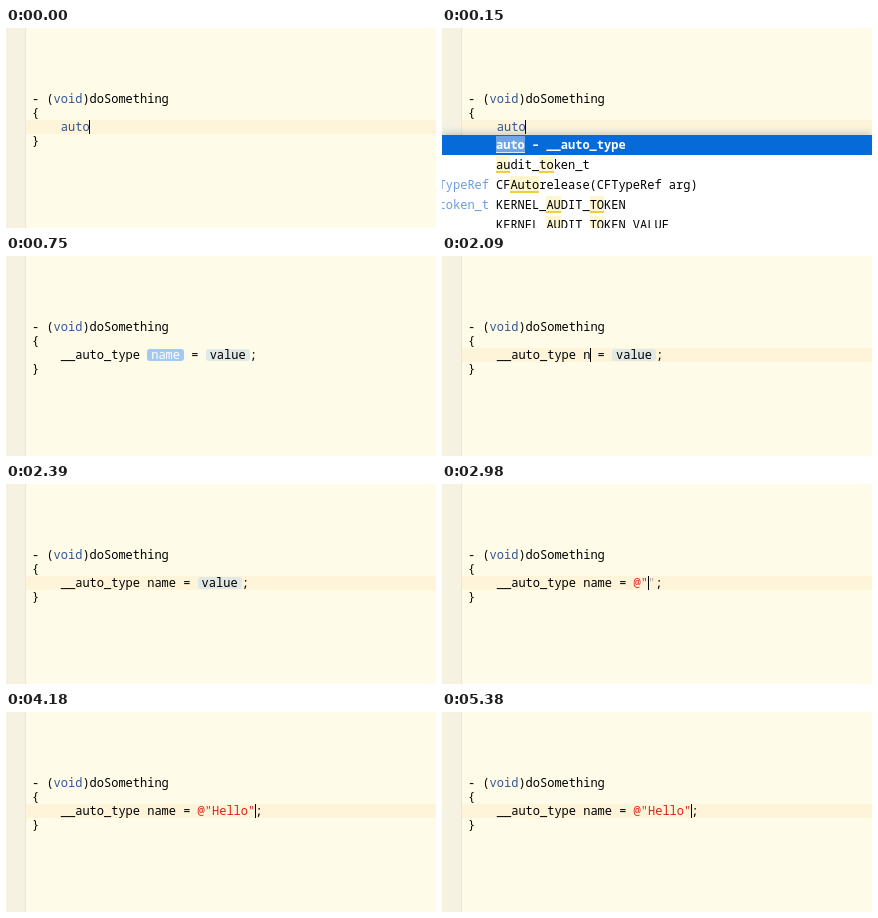
An HTML page for the animation above (5.77 s loop, 430 by 200 pixels).

```html
<!DOCTYPE html>
<html lang="en">
<head>
<meta charset="utf-8">
<title>Code completion</title>
<style>
  html, body { margin: 0; width: 100%; height: 100%; overflow: hidden; }
  body {
    position: relative;
    background: #fefbe8;
    color: #000;
    font: 500 12px/14px "Noto Sans Mono", "DejaVu Sans Mono", monospace;
    font-variant-ligatures: none;
    white-space: pre;
  }
  #gutter {
    position: absolute; left: 0; top: 0; width: 19px; height: 200px;
    background: #f5f2e2; border-right: 1px solid #e9e6d8;
  }
  .line { position: absolute; left: 26px; height: 14px; }
  #active { position: absolute; left: 20px; right: 0; top: 92px; height: 14px; background: #fdf4da; }
  #caret { position: absolute; top: 92px; width: 1px; height: 14px; background: #000; }
  .kw { color: #34568f; }
  .str { color: #dc2416; }
  .dim { color: #b3aaa4; }
  .slot {
    display: inline-block; height: 12px; line-height: 12px; padding: 0 4px;
    border-radius: 3px; background: #e0e9e6; vertical-align: top; margin-top: 1px;
  }
  .slot.on { background: #a3c8f2; color: #fff; }
  .popup {
    position: absolute; top: 107px; right: 0; overflow: hidden;
    background: #fff; line-height: 20px; box-shadow: 0 0 9px rgba(0, 0, 0, .28);
  }
  #list { left: 0; height: 93px; }
  #hint { left: 103px; height: 20px; }
  .row { position: relative; height: 20px; }
  .row > * { position: absolute; top: 0; }
  .row > i { right: calc(100% - 47px); font-style: normal; color: #6b9be0; }
  .row > span { left: 54px; }
  #hint .row > span { left: 38px; }
  .row b { font-weight: inherit; background: #fdf6d0; box-shadow: inset 0 -2px #f0cf3c; }
  .row.sel { background: #076ad9; color: #fff; font-weight: 700; }
  .row.sel b { background: #6fa5e6; box-shadow: inset 0 -1px #dce9fa; }
  [hidden] { display: none !important; }
</style>
</head>
<body>
<div id="gutter"></div>
<div id="active"></div>
<div class="line" style="top:64px">- (<span class="kw">void</span>)doSomething</div>
<div class="line" style="top:78px">{</div>
<div class="line" style="top:92px" id="code"></div>
<div class="line" style="top:106px">}</div>
<div id="caret"></div>
<div class="popup" id="list"><div class="row sel"><span><b>auto</b> – __auto_type</span></div><div class="row"><span><b>au</b>dit_<b>to</b>ken_t</span></div><div class="row"><i>CFTypeRef</i><span>CF<b>Auto</b>release(CFTypeRef arg)</span></div><div class="row"><i>audit_token_t</i><span>KERNEL_<b>AU</b>DIT_<b>TO</b>KEN</span></div><div class="row"><span>KERNEL_<b>AU</b>DIT_<b>TO</b>KEN_VALUE</span></div></div>
<div class="popup" id="hint"><div class="row sel"><span><b>nam</b>e</span></div></div>
<script>
  const LOOP = 5770, LEFT = 26, CHAR = 7.2;
  const el = id => document.getElementById(id);
  const [code, active, caret, list, hint] = ["code", "active", "caret", "list", "hint"].map(el);

  const span = (cls, text) => `<span class="${cls}">${text}</span>`;
  const slot = (text, on) => span(on ? "slot on" : "slot", text);
  const assign = (name, value) => `    __auto_type ${name} = ${value};`;
  const auto = "    " + span("kw", "auto");
  const open = text => assign("name", span("str", '@"' + text) + span("dim", '"'));
  const done = assign("name", span("str", '@"Hello"'));

  // at: start in ms, col: caret column, plain: no line highlight
  const steps = [
    { at: 0, html: auto, col: 8 },
    { at: 150, html: auto, col: 8, popup: list },
    { at: 300, html: auto, popup: list, plain: true },
    { at: 750, html: assign(slot("name", true), slot("value")), plain: true },
    { at: 2090, html: assign("n", slot("value")), col: 17 },
    { at: 2240, html: assign("nam", slot("value")), col: 19, popup: hint },
    { at: 2390, html: assign("name", slot("value")) },
    { at: 2530, html: assign("name", slot("value", true)), plain: true },
    { at: 2980, html: open(""), col: 25 },
    { at: 3280, html: open("H"), col: 26 },
    { at: 3430, html: open("Hel"), col: 28 },
    { at: 3580, html: open("Hell"), col: 29 },
    { at: 3730, html: open("Hello"), col: 30 },
    { at: 4180, html: done, col: 31 },
    { at: 4780, html: done },
    { at: 5380, html: done, col: 31 }
  ];

  let shown;
  function show(step) {
    code.innerHTML = step.html;
    active.hidden = !!step.plain;
    caret.hidden = !step.col;
    if (step.col) caret.style.left = Math.floor(LEFT + step.col * CHAR) + "px";
    for (const popup of [list, hint]) popup.hidden = step.popup !== popup;
    shown = step;
  }

  const start = performance.now();
  function tick() {
    const t = (performance.now() - start) % LOOP;
    const step = steps.findLast(s => s.at <= t);
    if (step !== shown) show(step);
    requestAnimationFrame(tick);
  }
  tick();
</script>
</body>
</html>
```
